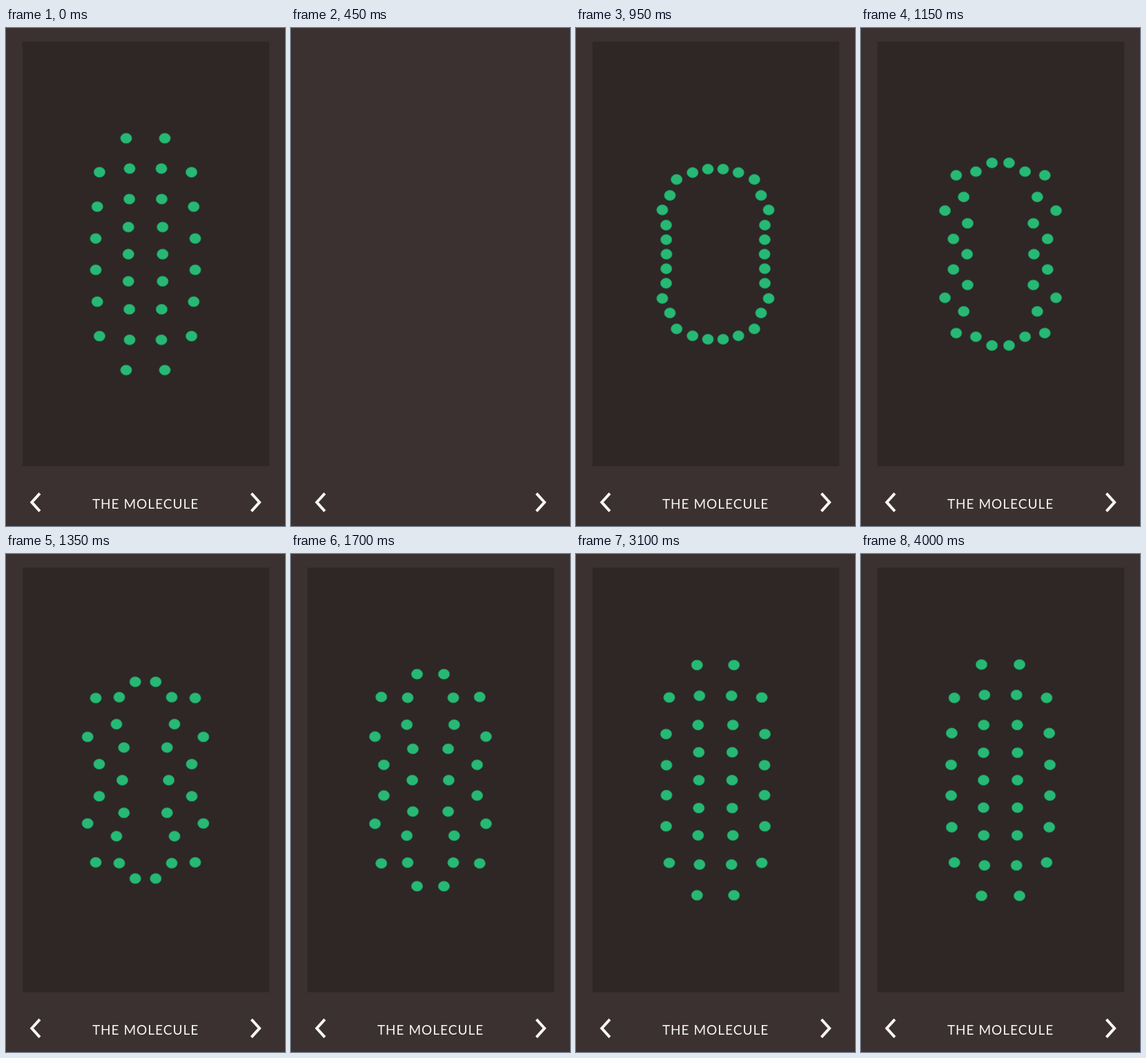
These frames come from a looping animation (404 by 720 pixels, 4.05 s). An HTML page:

```html
<!DOCTYPE html>
<html lang="en">
<head>
<meta charset="utf-8">
<title>The Molecule</title>
<style>
  html, body { margin: 0; width: 100%; height: 100%; overflow: hidden; background: #3a3130; }
  svg { display: block; width: 100vw; height: 100vh; }
  text { font: 19px Lato, "Open Sans", sans-serif; letter-spacing: 1px; fill: #f7f5f5; }
  .arrow { fill: none; stroke: #f7f5f5; stroke-width: 4; }
  .dot { fill: #27b974; stroke: #218c5a; stroke-width: 0.8; }
</style>
</head>
<body>
<svg viewBox="0 0 404 720">
  <rect width="404" height="720" fill="#3a3130"/>
  <g id="scene">
    <rect x="23.5" y="19.5" width="358" height="614.5" fill="#342b2a"/>
    <rect x="24.5" y="20.5" width="356" height="612.5" fill="#2e2726"/>
    <g id="dots"></g>
    <text x="202" y="695" text-anchor="middle">THE MOLECULE</text>
  </g>
  <path id="left" class="arrow" d="M49 672.8 37.3 685.7 49 698.6"/>
  <path class="arrow" d="M49 672.8 37.3 685.7 49 698.6" transform="translate(404.4) scale(-1 1)"/>
</svg>
<script>
const LOOP = 4050, HOLD = 450, STEP = 50;
const CX = 202, CY = 327, RADIUS = 118;
const FADE_START = 500, FADE_END = 800;

// Each pose lists one quadrant's offsets from the centre; the rest is mirrored.
const pose = s => s.split(' ').map(p => p.split(',').map(Number));
const circle = Array.from({ length: 8 }, (_, i) => {
  const a = (6 + 12 * i) * Math.PI / 180;
  return [RADIUS * Math.sin(a), RADIUS * Math.cos(a)];
});
const times = [550, 950, 1350, 2150, 3100, 4000];
const poses = [
  circle,
  pose('11,123 33.2,118 56.3,108 66,85 77,64 71.5,42 71.3,21 71,0'),
  pose('14.8,142.2 38,120 72,118.8 42,81 83.8,62.6 31.2,47.2 67,23.2 33.6,0'),
  pose('24.3,162 25,118 69.5,121 29,79.8 74.3,64 23,42 68.8,20.7 22.8,0'),
  pose('26.7,166.4 23.2,122 67,119.6 25.2,79.8 71.5,66.7 24.2,40.3 71,21.7 24,0'),
  pose('27.5,167.2 23.2,123.2 66.8,119 24.2,79.8 70.6,68 24.6,39.7 71.5,22.2 24.5,0')
];
const settled = pose('28,167.6 23,123.8 66.6,118.5 23.4,79.7 69.8,68.7 24.8,39.2 72,22.7 24.8,0');

const clamp = (v, lo, hi) => Math.min(hi, Math.max(lo, v));

// Monotone cubic interpolation through the key values.
function curve(values) {
  const last = times.length - 1;
  const gap = i => times[i + 1] - times[i];
  const rise = i => (values[i + 1] - values[i]) / gap(i);
  const slopes = times.map((_, i) => {
    if (i === 0) return rise(0) * 0.7;
    if (i === last) return rise(last - 1);
    const a = rise(i - 1), b = rise(i);
    if (a * b <= 0) return 0;
    const wa = gap(i - 1) + 2 * gap(i), wb = 2 * gap(i - 1) + gap(i);
    return (wa + wb) / (wa / a + wb / b);
  });
  return time => {
    const t = clamp(time, times[0], times[last]);
    let i = 0;
    while (i < last - 1 && t > times[i + 1]) i++;
    const h = gap(i), s = (t - times[i]) / h, r = 1 - s;
    return values[i] * (1 + 2 * s) * r * r + values[i + 1] * s * s * (3 - 2 * s)
      + h * s * r * (slopes[i] * r - slopes[i + 1] * s);
  };
}

const tracks = circle.map((_, i) => [0, 1].map(axis => curve(poses.map(p => p[i][axis]))));

const scene = document.getElementById('scene');
const dots = [];
for (let i = 0; i < 8; i++) {
  for (const sx of [-1, 1]) {
    for (const sy of i < 7 ? [-1, 1] : [1]) {
      const el = document.createElementNS('http://www.w3.org/2000/svg', 'ellipse');
      el.setAttribute('class', 'dot');
      el.setAttribute('rx', 8.2);
      el.setAttribute('ry', 7.4);
      document.getElementById('dots').append(el);
      dots.push({ el, i, sx, sy });
    }
  }
}

function draw(ms) {
  const t = Math.floor((ms % LOOP) / STEP) * STEP;
  const resting = t < HOLD;
  const points = resting ? settled : tracks.map(([x, y]) => [x(t), y(t)]);
  scene.setAttribute('opacity', resting ? 1 : clamp((t - FADE_START) / (FADE_END - FADE_START), 0, 1));
  for (const { el, i, sx, sy } of dots) {
    el.setAttribute('cx', CX + sx * points[i][0]);
    el.setAttribute('cy', CY + sy * points[i][1]);
  }
}

const start = performance.now();
function tick() {
  draw(performance.now() - start);
  requestAnimationFrame(tick);
}
tick();
</script>
</body>
</html>
```
